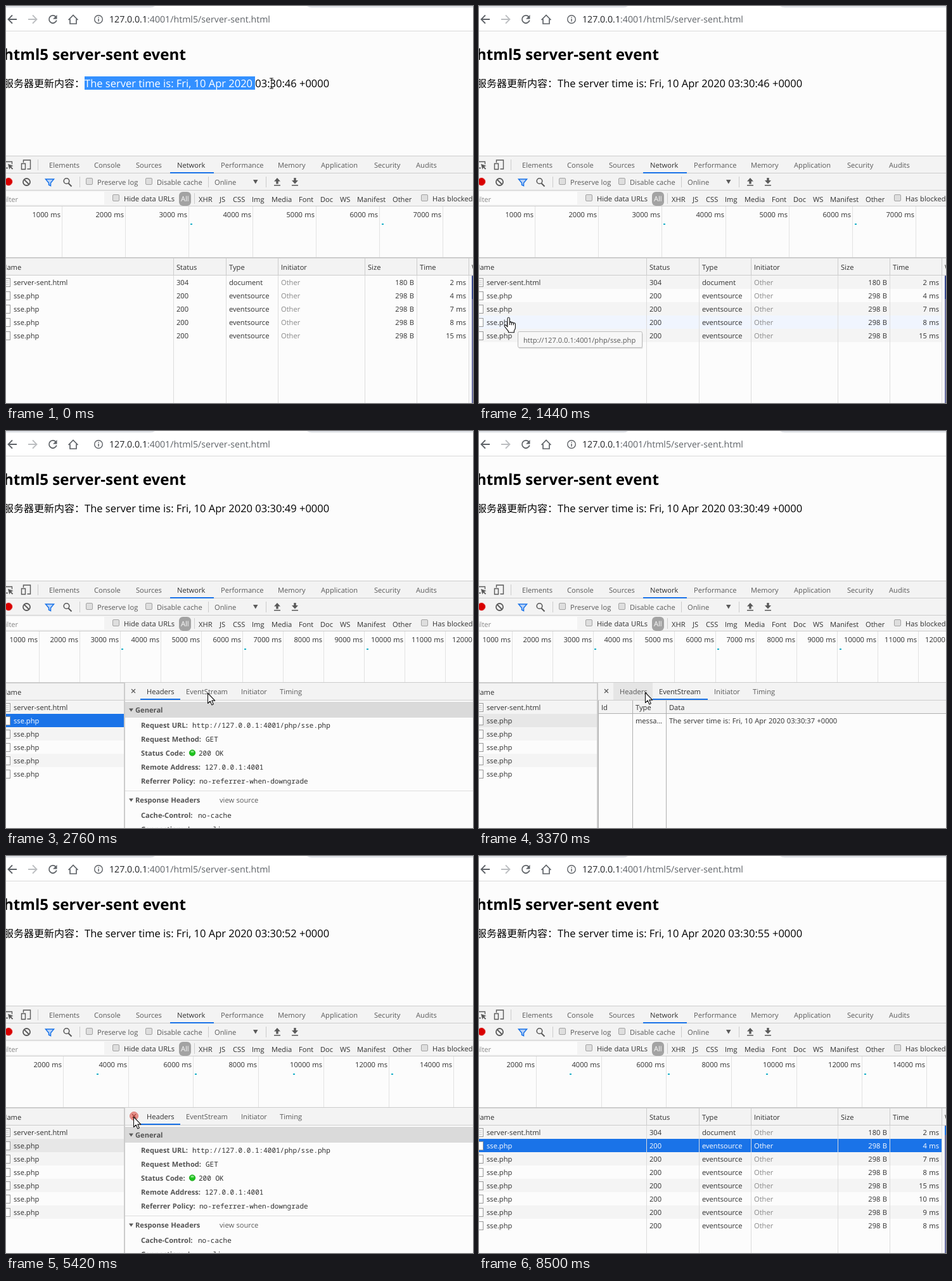
Recreate the animation shown at these times as an HTML page. Size 737 by 626 pixels, loop 8.83 s.

```html
<!DOCTYPE html>
<html lang="en">
<head>
<meta charset="utf-8">
<title>Server-sent events</title>
<style>
  html, body { margin: 0; width: 100%; height: 100%; overflow: hidden; background: #fcfcfc; }
  svg { display: block; }
  text { font: 11.15px "Open Sans", "Noto Sans", sans-serif; word-spacing: .5px; fill: #303030;
         text-rendering: geometricPrecision; white-space: pre; }
  .tab { fill: #5a5a5a; }
  .dim { fill: #888; }
  .lit { fill: #fff; }
  .end { text-anchor: end; }
  .key { font-weight: 700; fill: #545454; }
  .mono { font: 11px "Noto Sans Mono", "DejaVu Sans Mono", monospace; word-spacing: 0; }
  .url { font-size: 14.2px; fill: #5f6368; }
  .host { fill: #202124; }
  .h1 { font-size: 24.1px; font-weight: 700; word-spacing: 0; fill: #000; }
  .body { font-size: 16.5px; word-spacing: 0; fill: #000; }
  .cjk { font: 16px "Noto Sans CJK SC", "Noto Sans CJK", sans-serif; fill: #000; }
</style>
</head>
<body>
<svg id="stage" width="737" height="626" viewBox="0 0 737 626"></svg>
<script>
const LOOP = 8830, W = 737, H = 626;
const BLUE = '#1a73e8', BAR = '#f3f3f3', EDGE = '#ccc', PAPER = '#fcfcfc';

// moments at which the state of the page changes
const AT = { deselect: 580, tipOn: 1440, tipOff: 1590, open: 1870, tick1: 2610, stream: 2910,
             headers: 4850, tick2: 4990, closeHover: 5420, close: 6750, leave: 7050,
             tick3: 8370, lastRow: 8500 };

// pointer: time, shape, x, y
const POINTER = [
  [0, 'beam', 419, 122], [150, 'beam', 500, 126], [280, 'beam', 572, 131],
  [580, 'arrow', 540, 140], [720, 'arrow', 377, 170], [870, 'arrow', 200, 400],
  [1010, 'hand', 110, 572], [1150, 'hand', 60, 520], [1300, 'hand', 47, 491],
  [1590, 'hand', 42, 480], [1720, 'hand', 36, 466], [1870, 'hand', 36, 464],
  [2170, 'hand', 90, 450], [2320, 'arrow', 180, 430], [2470, 'arrow', 260, 420],
  [2610, 'arrow', 310, 414], [2760, 'arrow', 318, 413], [3220, 'arrow', 295, 412],
  [3370, 'arrow', 262, 412], [3520, 'arrow', 330, 425], [3670, 'arrow', 419, 431],
  [4100, 'arrow', 271, 422], [4560, 'arrow', 262, 415], [4700, 'arrow', 250, 412],
  [5130, 'arrow', 232, 412], [5280, 'arrow', 215, 411], [5420, 'arrow', 201, 411],
  [6750, 'hand', 202, 411], [7050, 'hand', 215, 450], [7190, 'hand', 240, 500],
  [7340, 'hand', 270, 560], [7480, 'hand', 300, 605], [7630, 'none', 0, 0]
];
const SHAPES = {
  beam: 'M-3-8h2.5l.5.5.5-.5H3M0-7.5V7.5M-3 8h2.5l.5-.5.5.5H3',
  arrow: 'M.5.5v16l3.700-3.500 2.600 5.900 2.500-1.100-2.500-5.700h5z',
  hand: 'M-2 2q0-2 1.700-2t1.700 2v6q1.400-1.200 3 .3 1.600-1.200 3 .5 2.600-.6 3 2v5q0 3-2 5v3h-9v-2l-6-7.500q-1-2 .8-2.400 1.600 0 3.800 3z' +
        'M1.400 8v4M4.400 8.300v4M7.400 8.800v3.500'
};
const DURATIONS = [2, 4, 7, 8, 15, 10, 9, 8];
// waterfall ruler: first line, spacing, ms per line, first dot, dot spacing
const RULERS = [
  [88, 100.2, 1000, 291, 302], [52, 64.1, 1000, 182, 193.5], [90, 102.7, 2000, 143, 155]
];

const rect = (x, y, w, h, fill, more = '') =>
  `<rect x="${x}" y="${y}" width="${w}" height="${h}" fill="${fill}" ${more}/>`;
const text = (x, y, s, cls = '') => `<text x="${x}" y="${y}" class="${cls}">${s}</text>`;
const line = (d, color = '#5a5a5a', width = 1.5, fill = 'none') =>
  `<path d="${d}" stroke="${color}" stroke-width="${width}" fill="${fill}"/>`;
const fill = (d, color = '#5a5a5a') => `<path d="${d}" fill="${color}"/>`;
const ring = (x, y, r, color, width, inside = 'none') =>
  `<circle cx="${x}" cy="${y}" r="${r}" stroke="${color}" stroke-width="${width}" fill="${inside}"/>`;
const vline = (x, y, h, color = EDGE) => rect(x, y, 1, h, color);
const check = (x, y) => rect(x + .5, y + .5, 10, 10, '#dedede', 'rx="1.5" stroke="#a3a3a3"');
const labels = (list, y, cls) => list.map(([x, s]) => text(x, y, s, cls)).join('');

function browserBar() {
  return rect(0, 0, W, 39, '#fff') +
    fill('M0 0H235Q232 2.5 228 2.5H0zM475 0H737V2.5H483Q478 2.5 475 0z', '#dee1e6') +
    rect(0, 39, W, 1, '#d9d9d9') +
    line('M17 21H4M10 14.5L3.5 21l6.5 6.5', '#5f6368', 1.8) +
    line('M35 21H48M42 14.5l6.5 6.5-6.5 6.5', '#bcbec1', 1.8) +
    line('M78.5 17a6 6 0 1 0 1.3 5.5', '#5f6368', 1.8) + fill('M80.5 14v6.5h-6.5z', '#5f6368') +
    line('M98.5 22l7.5-7.5 7.5 7.5M101 20.5v7.5h10v-7.5', '#5f6368', 1.7) +
    ring(146, 21, 6.3, '#5f6368', 1.4) + rect(145.3, 20, 1.5, 4.5, '#5f6368') + rect(145.3, 17.3, 1.5, 1.5, '#5f6368') +
    text(163, 26, '<tspan class="host">127.0.0.1</tspan>:4001/html5/server-sent.html', 'url');
}

function page(t) {
  const marked = t < AT.deselect;
  const sec = 46 + 3 * [AT.tick1, AT.tick2, AT.tick3].filter(a => t >= a).length;
  return rect(0, 40, W, 196, PAPER) +
    text(-4, 85, 'html5 server-sent event', 'h1') +
    text(-4, 128, '服务器更新内容：', 'cjk') +
    (marked ? rect(124, 111, 269, 21, '#3390ff') : '') +
    text(124, 128, `<tspan class="${marked ? 'lit' : ''}">The server time is: Fri, 10 Apr 2020 </tspan>03:30:${sec} +0000`, 'body');
}

function toolbars() {
  const tabs = [[68, 'Elements'], [139, 'Console'], [205, 'Sources'], [339, 'Performance'],
    [429, 'Memory'], [497, 'Application'], [581, 'Security'], [647, 'Audits']];
  const kinds = [[304, 'XHR'], [337, 'JS'], [358, 'CSS'], [388, 'Img'], [419, 'Media'], [462, 'Font'],
    [496, 'Doc'], [527, 'WS'], [554, 'Manifest'], [610, 'Other']];
  return rect(0, 236, W, 80, BAR) +
    [236, 263, 290, 315].map(y => rect(0, y, W, 1, EDGE)).join('') +
    // tab row
    line('M0 245.5h9.5v4M0 255.5h3', '#5a5a5a', 1.3) + fill('M3 249l8.5 3-3.3 1.5 3 3-1.3 1.3-3-3-1.5 3z') +
    line('M27.5 247v-4h11v14h-5M24.5 248.5h6v9h-6z', '#5a5a5a', 1.4) + vline(50, 242, 17) +
    labels(tabs, 255, 'tab') + text(270, 255, 'Network') + rect(259, 262, 69, 2, BLUE) +
    // controls
    ring(4, 277, 6.5, '#f3d0d0', 1, '#f3d0d0') + ring(4, 277, 5.5, '#d90000', 1, '#d90000') +
    ring(32.5, 277.5, 5.5, '#5a5a5a', 1.8) + line('M28.5 273.5l8 8', '#5a5a5a', 1.8) +
    line('M62.5 273h13l-5 6v4.5l-3-1.5v-3z', BLUE, 1.5, '#b9d3f8') +
    ring(95.5, 276, 4.3, '#5a5a5a', 1.6) + line('M98.5 279.5l5 5', '#5a5a5a', 2) +
    [116, 319, 410].map(x => vline(x, 269, 17)).join('') +
    check(126, 271) + check(220, 271) +
    labels([[144, 'Preserve log'], [238, 'Disable cache'], [329, 'Online']], 282, 'tab') +
    fill('M390 274h7.5l-3.7 6.5z') +
    fill('M428 271l5 5.5h-3.3v4h-3.4v-4H423zM423 282h10v1.5H423z') +
    fill('M454.3 271h3.4v4h3.3l-5 5.5-5-5.5h3.3zM451 282h10v1.5H451z') +
    // filter row
    rect(0, 293, 155, 20, PAPER) + text(-7, 309, 'Filter', 'dim') +
    check(168, 297) + text(186, 308, 'Hide data URLs') +
    rect(273, 293, 19, 22, '#a3a3a3', 'rx="6"') + text(276, 308, 'All', 'lit') + vline(297, 295, 17) +
    labels(kinds, 309) + check(655, 297) + text(673, 308, 'Has blocked cookies');
}

function ruler(t) {
  const [x0, gap, unit, dot, dotGap] = RULERS[t < AT.tick1 ? 0 : t < AT.tick2 ? 1 : 2];
  let s = rect(0, 316, W, 80, PAPER);
  for (let i = 0; i < 12; i++) {
    const x = Math.round(x0 + i * gap);
    s += vline(x, 316, 80, '#e2e2e2') + text(x - 2, 333, `${unit * (i + 1)} ms`, 'end');
  }
  for (let x = dot; x < W; x += dotGap) s += rect(Math.round(x), 343, 3, 2, '#1ab0c8');
  return s + rect(0, 396, W, 2, EDGE);
}

function fileIcon(y, lined) {
  return rect(-4.5, y - 6.5, 11, 13, '#fff', 'stroke="#999"') +
    (lined ? line(`M0 ${y - 2.5}h4.5M0 ${y + .5}h4.5M0 ${y + 3.5}h4.5`, '#bbb', 1) : '');
}

function table(t, open, pointer) {
  const count = 5 + [AT.tick1, AT.tick2, AT.lastRow].filter(a => t >= a).length;
  const width = open ? 186 : 730;
  const focused = t < AT.stream || t >= AT.close;
  const hover = pointer[1] === 'hand' ? Math.floor((pointer[3] - 425) / 21) : -1;
  let s = rect(0, 398, W, 228, PAPER) + rect(0, 398, W, 26, BAR);
  if (t >= AT.close && t < AT.leave) s += rect(0, 398, 264, 26, '#e5e5e5');
  s += rect(0, 424, W, 1, EDGE);
  let cells = '';
  for (let i = 0; i < count; i++) {
    const top = 425 + 21 * i, base = top + 15;
    const chosen = i === 1 && t >= AT.open;
    const lit = chosen && focused ? 'lit' : '';
    const color = chosen ? (focused ? BLUE : '#e7e7e7')
      : i === hover ? '#f0f5fe'
      : i % 2 === 0 && t >= AT.deselect ? '#f4f4f4' : PAPER;
    s += rect(0, top, width, 21, color);
    cells += fileIcon(top + 11, i === 0) + text(12, base, i ? 'sse.php' : 'server-sent.html', lit);
    if (open) continue;
    cells += text(269, base, i ? 200 : 304, lit) + text(352, base, i ? 'eventsource' : 'document', lit) +
      text(434, base, 'Other', lit || 'dim') + text(644, base, i ? '298 B' : '180 B', 'end ' + lit) +
      text(726, base, DURATIONS[i] + ' ms', 'end ' + lit);
  }
  if (!open) {
    s += [264, 347, 429, 566, 648, 730].map(x => vline(x, 398, 27) + vline(x, 425, 201, '#dcdcdc')).join('') +
      rect(735, 425, 2, 201, '#6a70a2') + rect(735, 426, 2, t < AT.close ? 36 : 14, t < AT.close ? '#35478f' : BLUE) +
      labels([[269, 'Status'], [352, 'Type'], [434, 'Initiator'], [571, 'Size'], [653, 'Time'], [735, 'Waterfall']], 416);
  }
  return s + cells + text(-7, 416, 'Name');
}

function headersView() {
  const pairs = [['Request URL:', 294, 'http://127.0.0.1:4001/php/sse.php'], ['Request Method:', 315, 'GET'],
    ['Status Code:', 304, '200 OK'], ['Remote Address:', 314, '127.0.0.1:4001'],
    ['Referrer Policy:', 305, 'no-referrer-when-downgrade']];
  const pair = ([k, x, v], y) => text(213, y, k, 'key') + text(x, y, v, 'mono');
  return rect(188, 427, 549, 25, '#dadada') +
    fill('M194 437.5h7l-3.5 5z') + text(204, 444, 'General', 'key') +
    pairs.map((p, i) => pair(p, 468 + 22 * i)).join('') +
    ring(294, 507.5, 4.6, '#13a313', 1, '#1fc41f') + '<ellipse cx="294" cy="505.5" rx="2.8" ry="1.5" fill="#8ae88a"/>' +
    rect(188, 567, 549, 1, '#ddd') + fill('M194 579.5h7l-3.5 5z') +
    text(204, 586, 'Response Headers', 'key') + text(337, 586, 'view source', 'tab') +
    pair(['Cache-Control:', 303, 'no-cache'], 610) + pair(['Connection:', 287, 'keep-alive'], 632);
}

function streamView() {
  return rect(188, 425, 549, 20, BAR) + rect(188, 445, 549, 1, '#b0b0b0') +
    [188, 242, 295].map(x => vline(x, 425, 201, '#b0b0b0')).join('') +
    labels([[193, 'Id'], [247, 'Type'], [300, 'Data']], 440) +
    labels([[247, 'messa...'], [300, 'The server time is: Fri, 10 Apr 2020 03:30:37 +0000']], 461);
}

function details(t, pointer) {
  const stream = t >= AT.stream && t < AT.headers;
  const hot = t >= AT.closeHover;
  const overTab = pointer[3] < 424 && pointer[2] > 212 && pointer[2] < 275;
  const tabs = [[222, 'Headers'], [284, 'EventStream'], [371, 'Initiator'], [432, 'Timing']];
  const active = stream ? 1 : 0;
  return rect(186, 398, W, 228, PAPER) + rect(188, 397, 549, 27, BAR) +
    (stream && overTab ? rect(212, 397, 62, 27, '#e5e5e5') : '') +
    rect(188, 424, 549, 1, EDGE) + rect(186, 398, 2, 228, EDGE) +
    (hot ? ring(202, 410, 6.5, '#dc7f78', 1, '#e8928b') : '') +
    line(hot ? 'M199 407l6 6M205 407l-6 6' : 'M198 407l6 6M204 407l-6 6', hot ? '#a8443c' : '#5a5a5a', 1.3) +
    tabs.map(([x, s], i) => text(x, 415, s, i === active ? '' : 'tab')).join('') +
    (stream ? streamView() + rect(274, 422, 87, 2, BLUE) : headersView() + rect(212, 422, 63, 2, BLUE));
}

function tooltip() {
  return rect(62.5, 515.5, 196, 25, '#000', 'opacity=".12" rx="2"') +
    rect(61.5, 513.5, 196, 25, '#f7f7f7', 'rx="2" stroke="#bdbdbd"') +
    text(70, 531, 'http://127.0.0.1:4001/php/sse.php', 'tab');
}

function cursor([, shape, x, y]) {
  if (shape === 'none') return '';
  const inside = shape === 'beam' ? 'none' : '#fff';
  return `<g transform="translate(${x} ${y})" stroke-linejoin="round">${line(SHAPES[shape], '#111', 1.1, inside)}</g>`;
}

function draw(t) {
  const pointer = POINTER.filter(p => p[0] <= t).pop();
  const open = t >= AT.open && t < AT.close;
  return browserBar() + page(t) + toolbars() + ruler(t) + table(t, open, pointer) +
    (open ? details(t, pointer) : '') +
    (t >= AT.tipOn && t < AT.tipOff ? tooltip() : '') + cursor(pointer);
}

const stage = document.getElementById('stage');
const changes = [...new Set([...POINTER.map(p => p[0]), ...Object.values(AT)])].sort((a, b) => a - b);
const start = performance.now();
let shown = -1;
function tick() {
  const t = (performance.now() - start) % LOOP;
  const step = changes.filter(c => c <= t).pop();
  if (step !== shown) {
    stage.innerHTML = draw(step);
    shown = step;
  }
  requestAnimationFrame(tick);
}
tick();
</script>
</body>
</html>
```
